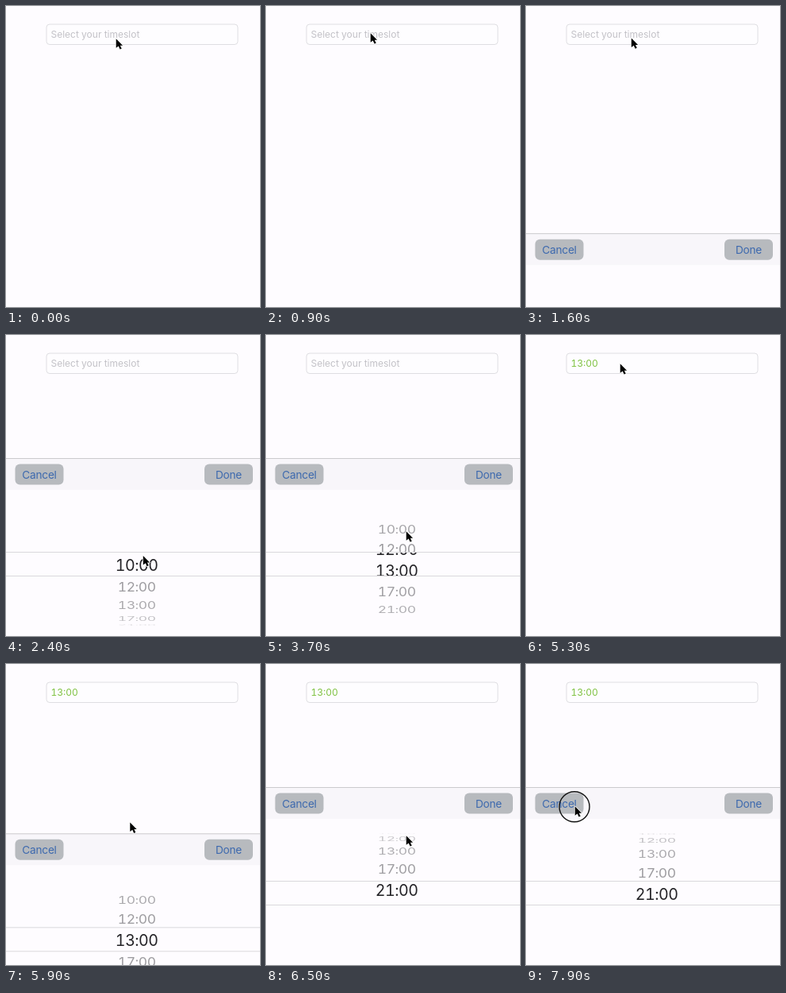
Write an HTML page that moves like this. It is 320 px wide and 379 px high and loops after 8000 ms.

```html
<!DOCTYPE html>
<html lang="en">
<head>
<meta charset="utf-8">
<title>Timeslot picker</title>
<style>
  html, body { margin: 0; width: 100%; height: 100%; overflow: hidden; background: #fefcff; }
  svg { display: block; width: 320px; height: 379px; font-family: Inter, Roboto, sans-serif; font-variant-numeric: tabular-nums; }
  .button rect { fill: #b7babe; }
  .button text { fill: #3d69ae; font-size: 13.7px; letter-spacing: -.25px; text-anchor: middle; }
  .row { text-anchor: middle; letter-spacing: -.45px; }
  #rim .row { font-size: 17.5px; fill: #98979b; }
  #lens .row { font-size: 19.6px; fill: #232226; }
</style>
</head>
<body>
<svg viewBox="0 0 320 379">
  <defs>
    <clipPath id="band"><rect y="274" width="320" height="30"/></clipPath>
    <clipPath id="outside"><path d="M0 195H320V274H0ZM0 304H320V379H0Z"/></clipPath>
  </defs>
  <rect width="320" height="379" fill="#fefcff"/>
  <rect x="51" y="23" width="241" height="25.5" rx="4" fill="#fefdff" stroke="#dfdee2"/>
  <text id="field" x="56.5" y="40" font-size="12"></text>
  <g id="sheet">
    <rect y="155" width="320" height="224" fill="#fefcff"/>
    <rect y="155" width="320" height="40" fill="#f8f6fa"/>
    <path d="M0 155.5H320" stroke="#cbcacd"/>
    <g class="button"><rect x="11.5" y="162.5" width="61" height="26" rx="6"/><text x="42" y="180.7">Cancel</text></g>
    <g class="button"><rect x="250" y="162.5" width="61" height="26" rx="6"/><text x="280.5" y="180.7">Done</text></g>
    <g clip-path="url(#outside)"><g id="rim"></g></g>
    <g clip-path="url(#band)"><g id="lens"></g></g>
    <path d="M0 273.5H320M0 303.5H320" stroke="#dad9dc"/>
  </g>
  <g id="pointer">
    <circle id="ring" r="19" cy=".8" fill="none" stroke="#111" stroke-width="1.4"/>
    <path transform="translate(.7 .3) scale(.9)" d="M0 0V12.8L3.3 10.2L5.4 14.8L7.8 13.7L5.7 9.3H9.3Z" stroke="#fff" stroke-width="1.6" paint-order="stroke" stroke-linejoin="round"/>
  </g>
</svg>
<script>
const LOOP = 8000, STEP = 100;
const MID = 289.8, RADIUS = 76.3, ANGLE = 0.361, ROW = RADIUS * ANGLE;
const SLOP = 6.5; // pointer travel before the wheel follows
const slots = ['10:00', '12:00', '13:00', '17:00', '21:00'];
const last = slots.length - 1;

const home = { x: 138, y: 41 };
const field = { x: 131, y: 34 }, done = { x: 277, y: 175 }, cancel = { x: 61, y: 179 };
const wheelAt = y => ({ x: 176, y });

const moves = [
  { from: 0, to: 400, goal: field },
  { from: 1500, to: 2600, goal: wheelAt(301) },
  { from: 2800, to: 3500, goal: wheelAt(247) },
  { from: 3700, to: 4300, goal: done },
  { from: 4500, to: 5300, goal: { x: 118, y: 36 } },
  { from: 5600, to: 6100, goal: wheelAt(288) },
  { from: 6200, to: 6500, goal: wheelAt(216) },
  { from: 6500, to: 6800, goal: done },
  { from: 6800, to: 7500, goal: { x: 30, y: 174 } },
  { from: 7500, to: 7800, goal: cancel }
];
const drags = [{ from: 2800, to: 3700 }, { from: 6200, to: 6500 }];
const taps = [800, 4400, 5500, 7900];
const toggles = [1400, 4500, 5600];

const $ = id => document.getElementById(id);
const ease = (t, from, to) => {
  const p = Math.min(1, Math.max(0, (t - from) / (to - from)));
  return p * p * (3 - 2 * p);
};
const mix = (a, b, p) => a + (b - a) * p;

const pointerAt = t => moves.reduce((at, { from, to, goal }) => {
  const p = ease(t, from, to);
  return { x: mix(at.x, goal.x, p), y: mix(at.y, goal.y, p) };
}, home);

// Each toggle reverses the sheet: up, down, up.
const sheetOpen = t => toggles.reduce((open, at, i) => mix(open, 1 - i % 2, ease(t, at, at + 450)), 0);

// The wheel follows a drag, resists past the last row, then snaps to a row.
function wheelPos(t) {
  return drags.reduce((pos, { from, to }) => {
    if (t < from) return pos;
    const travel = pointerAt(from).y - pointerAt(Math.min(t, to)).y;
    const raw = pos + Math.max(0, travel - SLOP) / ROW;
    const held = raw > last ? last + (raw - last) / 2 : raw;
    return mix(held, Math.round(held), ease(t, to, to + 400));
  }, 0);
}

const isPressed = t => taps.some(at => t >= at && t < at + STEP)
  || drags.some(({ from, to }) => t >= from && t < to);

function addRows(group) {
  return slots.map(slot => {
    const text = document.createElementNS('http://www.w3.org/2000/svg', 'text');
    text.textContent = slot;
    text.setAttribute('class', 'row');
    text.setAttribute('y', '.36em');
    group.append(text);
    return text;
  });
}
const rimRows = addRows($('rim')), lensRows = addRows($('lens'));

function place(el, x, y, scaleY = 1) {
  el.setAttribute('transform', `translate(${x} ${y}) scale(1 ${scaleY})`);
}

function draw(t) {
  const { x, y } = pointerAt(t), pos = wheelPos(t);
  place($('pointer'), x, y);
  place($('sheet'), 0, 225 * (1 - sheetOpen(t)));
  $('ring').style.display = isPressed(t) ? '' : 'none';

  const chosen = t > toggles[1];
  $('field').textContent = chosen ? '13:00' : 'Select your timeslot';
  $('field').setAttribute('fill', chosen ? '#7fc241' : '#c3c2c7');

  slots.forEach((_, i) => {
    const turn = (i - pos) * ANGLE, depth = Math.max(0, Math.cos(turn));
    place(rimRows[i], 164.7, MID + RADIUS * Math.sin(turn), depth);
    rimRows[i].style.opacity = depth ** .7;
    place(lensRows[i], 164.7, MID + RADIUS * turn);
  });
}

const start = performance.now();
function tick() {
  const t = (performance.now() - start) % LOOP;
  draw(Math.floor(t / STEP) * STEP);
  requestAnimationFrame(tick);
}
tick();
</script>
</body>
</html>
```
